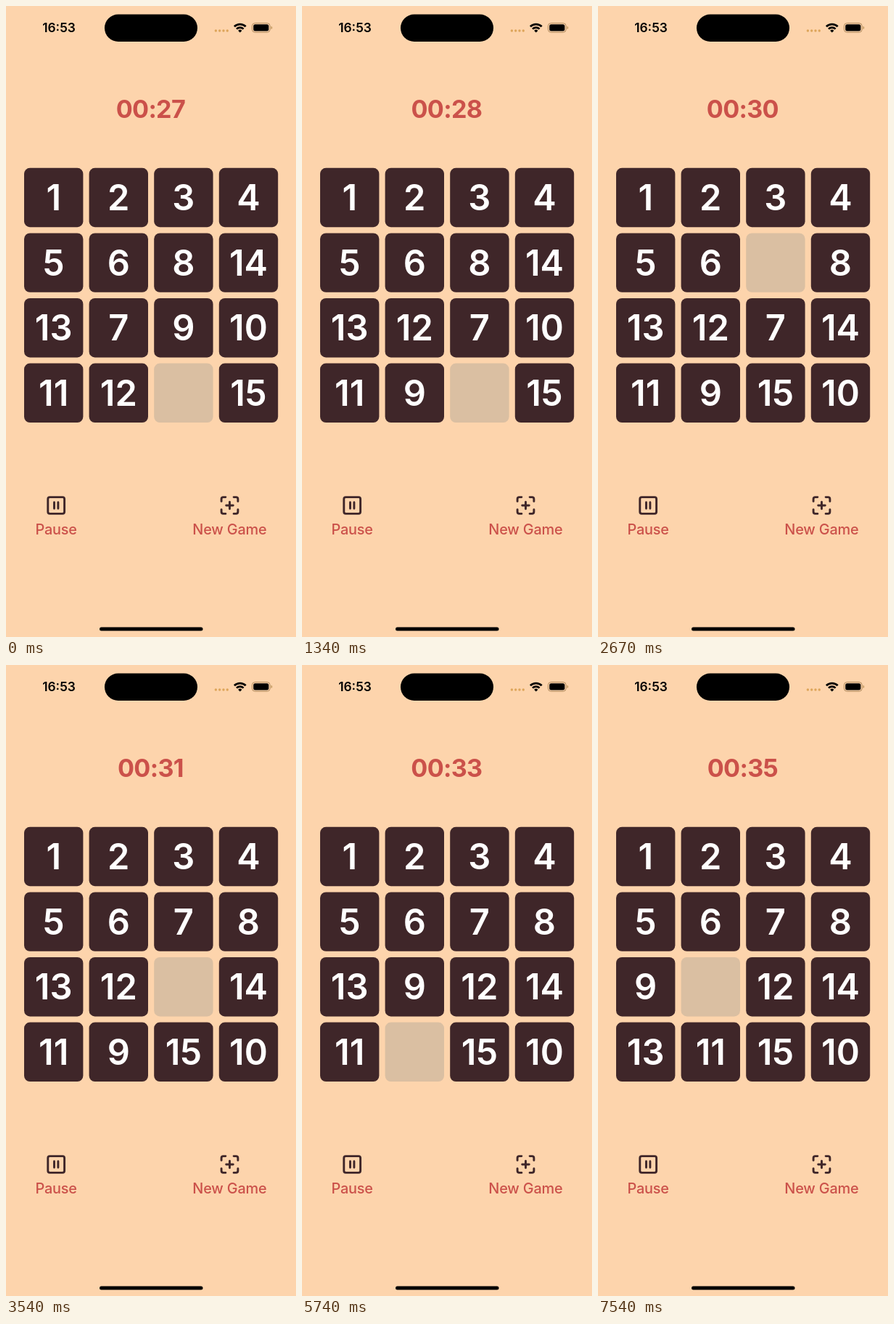
An HTML page that plays this animation: 400x868 px, repeating every 8 s.

```html
<!DOCTYPE html>
<html lang="en">
<head>
<meta charset="utf-8">
<title>Fifteen puzzle</title>
<style>
  html, body { margin: 0; width: 100%; height: 100%; overflow: hidden; background: #fdd4ac; }
  svg { display: block; width: 400px; height: 868px; font-family: Inter, "Liberation Sans", sans-serif; }
  text { text-anchor: middle; }
  .clock { font-size: 17.4px; font-weight: 600; }
  .timer { font-size: 34.2px; font-weight: 700; letter-spacing: -.7px; fill: #cb514a; }
  .label { font-size: 19.9px; font-weight: 500; letter-spacing: -.2px; fill: #cb514a; }
  .icon { fill: none; stroke: #3f2629; stroke-width: 2.9; stroke-linecap: round; stroke-linejoin: round; }
  .wifi { fill: none; stroke: #000; stroke-width: 2.7; }
  .tile rect { fill: #3f2629; }
  .tile text { font-size: 48.8px; font-weight: 600; fill: #fff; }
  .tile.blank rect { fill: #dabfa2; }
</style>
</head>
<body>
<svg viewBox="0 0 400 868">
  <text class="clock" x="73" y="36.2">16:53</text>
  <rect x="136" y="11.5" width="128" height="37.5" rx="18.75"/>
  <g fill="#dda55a">
    <circle cx="289.4" cy="34" r="1.7"/><circle cx="294.7" cy="34" r="1.7"/>
    <circle cx="300" cy="34" r="1.7"/><circle cx="305.3" cy="34" r="1.7"/>
  </g>
  <g class="wifi">
    <path d="M314.9 28.3a11.2 11.2 0 0 1 15.8 0"/>
    <path d="M318 31.6a6.8 6.8 0 0 1 9.6 0"/>
    <path d="M322.8 36.6l-2.6-2.7a3.7 3.7 0 0 1 5.2 0z" fill="#000" stroke="none"/>
  </g>
  <rect x="339.4" y="23.6" width="24.8" height="12.6" rx="4" fill="none" stroke="#b08a5c"/>
  <rect x="341.2" y="25.3" width="21.2" height="9.2" rx="2.5"/>
  <path d="M365.6 27.8q1.7.6 1.7 2.1t-1.7 2.1z" fill="#c0975c"/>

  <text class="timer" id="timer" x="199.4" y="154"></text>
  <g id="board"></g>

  <g class="icon" transform="translate(69.2 687)">
    <rect x="-11.4" y="-11.4" width="22.8" height="22.8" rx="2.6"/>
    <path d="M-2.7-4.2v8.4M2.7-4.2v8.4"/>
  </g>
  <text class="label" x="69.1" y="727">Pause</text>

  <g class="icon" transform="translate(308.5 687)">
    <path d="M-11.4-5.6v-3.2q0-2.6 2.6-2.6h3.2M5.6-11.4h3.2q2.6 0 2.6 2.6v3.2M11.4 5.6v3.2q0 2.6-2.6 2.6h-3.2M-5.6 11.4h-3.2q-2.6 0-2.6-2.6v-3.2"/>
    <path d="M-4.8 0h9.6M0-4.8v9.6"/>
  </g>
  <text class="label" x="308.4" y="727">New Game</text>

  <rect x="129" y="854.5" width="142.5" height="5" rx="2.5"/>
</svg>
<script>
  const LOOP = 8000, SIZE = 81.4, PITCH = 89.6, LEFT = 25, TOP = 222.8;
  const START = [1, 2, 3, 4, 5, 6, 8, 14, 13, 7, 9, 10, 11, 12, 0, 15];
  // [time in ms, cell the gap moves to]
  const MOVES = [
    [340, 10], [740, 9], [1000, 13], [1340, 14], [1670, 15], [1940, 11], [2270, 7],
    [2670, 6], [3140, 10], [5400, 9], [5740, 13], [6070, 12], [6400, 8], [6740, 9]
  ];
  const timer = document.getElementById('timer');
  const board = document.getElementById('board');

  function add(parent, name, attrs) {
    const el = document.createElementNS('http://www.w3.org/2000/svg', name);
    for (const key in attrs) el.setAttribute(key, attrs[key]);
    return parent.appendChild(el);
  }

  const tiles = START.map((_, i) => {
    const x = LEFT + i % 4 * PITCH, y = TOP + Math.floor(i / 4) * PITCH;
    const group = add(board, 'g', { transform: `translate(${x} ${y})` });
    add(group, 'rect', { width: SIZE, height: SIZE, rx: 8 });
    return { group, text: add(group, 'text', { x: SIZE / 2, y: 58.4 }) };
  });

  function cellsAt(t) {
    const cells = START.slice();
    let gap = cells.indexOf(0);
    for (const [time, next] of MOVES) {
      if (time > t) break;
      cells[gap] = cells[next];
      cells[next] = 0;
      gap = next;
    }
    return cells;
  }

  let shown = '';
  function draw(t) {
    const cells = cellsAt(t);
    const clock = '00:' + (27 + Math.floor((t + 460) / 1000));
    const state = clock + cells;
    if (state === shown) return;
    shown = state;
    timer.textContent = clock;
    tiles.forEach(({ group, text }, i) => {
      group.setAttribute('class', cells[i] ? 'tile' : 'tile blank');
      text.textContent = cells[i] || '';
    });
  }

  const begin = performance.now();
  function tick() {
    draw((performance.now() - begin) % LOOP);
    requestAnimationFrame(tick);
  }
  tick();
</script>
</body>
</html>
```
